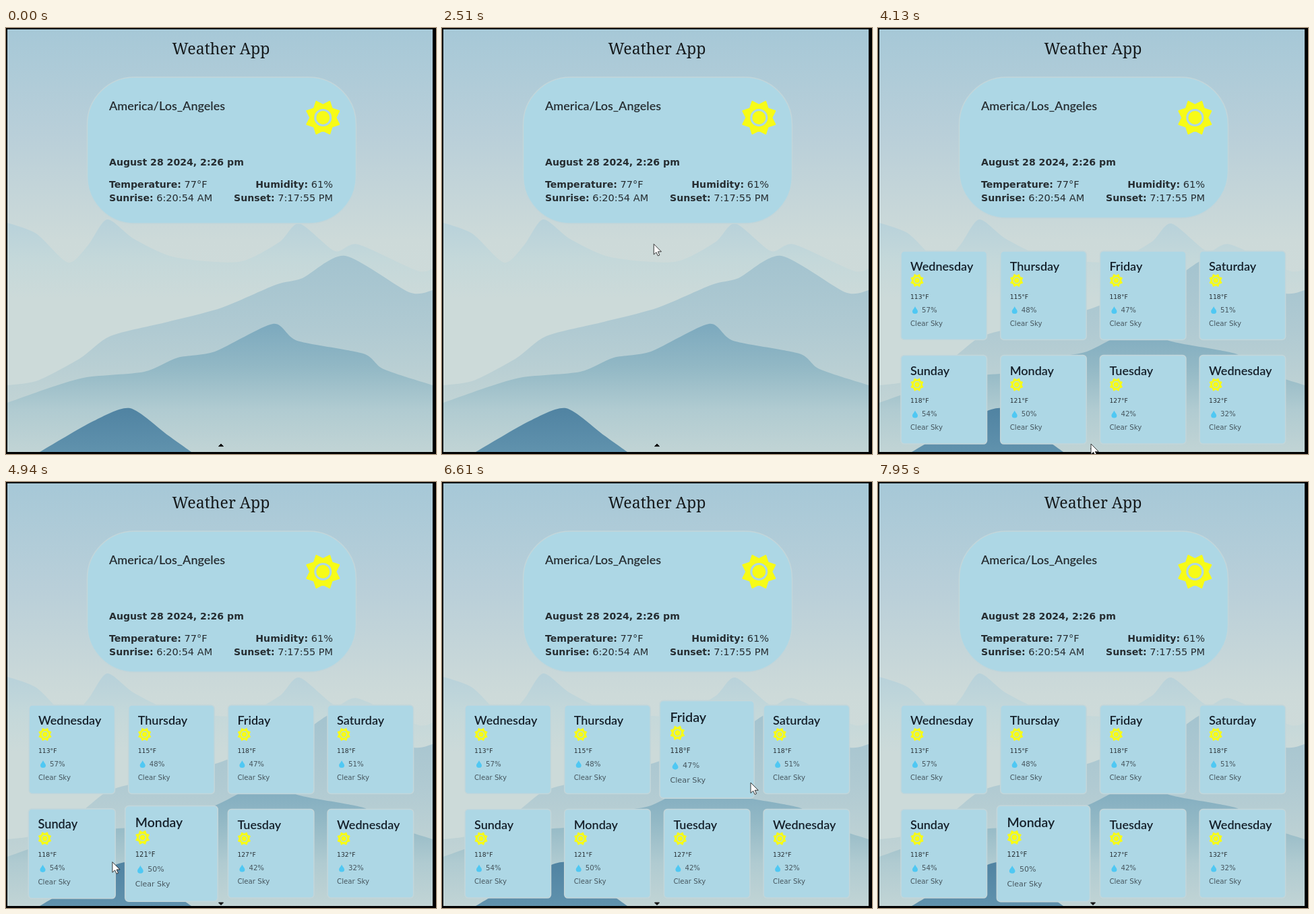
An HTML page for the animation above (8 s loop, 638x632 px).

```html
<!DOCTYPE html>
<html lang="en">
<head>
<meta charset="utf-8">
<title>Weather App</title>
<style>
  html, body { margin: 0; height: 100%; overflow: hidden; background: #000; }
  svg { display: block; width: 638px; height: 632px; }
  text { font-family: "DejaVu Sans", sans-serif; fill: #262d31; }
  .title { font: 23.1px "Noto Serif", serif; text-anchor: middle; fill: #15191b; }
  .head { font: 600 18px Lato, sans-serif; }
  .day { fill: #15202a; }
  .label { font-size: 14.1px; font-weight: bold; }
  .value { font-size: 14.5px; font-weight: normal; }
  .end { text-anchor: end; }
  .temp { font-size: 9.2px; }
  .small { font-size: 10.2px; fill: #46565e; }
  .panel { fill: #add7e5; stroke: #c3d6da; stroke-width: 1.5; }
</style>
</head>
<body>
<svg id="stage" viewBox="0 0 638 632"></svg>
<script>
const LOOP = 8000, OPEN = 4130, CARD_W = 127.5, CARD_H = 131.5;
const stage = document.getElementById('stage');

// Smooth curve through the points, closed along the bottom edge
function ridge(points) {
  const p = points.split(' ').map(s => s.split(',').map(Number));
  const at = i => p[Math.max(0, Math.min(p.length - 1, i))];
  const handle = (i, sign) => [0, 1].map(n => at(i)[n] + sign * (at(i + 1)[n] - at(i - 1)[n]) / 8);
  const curve = p.slice(1).map((q, i) => `C${handle(i, 1)} ${handle(i + 1, -1)} ${q}`).join('');
  return `M${p[0]}${curve}V629H${p[0][0]}Z`;
}

function layer([top, bottom, colours, points], i) {
  const stops = colours.split(' ').map((c, k, all) =>
    `<stop offset="${k / (all.length - 1)}" stop-color="${c}"/>`).join('');
  return `<linearGradient id="g${i}" gradientUnits="userSpaceOnUse" x1="0" x2="0" y1="${top}" y2="${bottom}">${stops}</linearGradient>
    <path fill="url(#g${i})" d="${ridge(points)}"/>`;
}

// Top y, bottom y, gradient, outline; from the sky to the nearest hill
const layers = [
  [2, 629, '#a6c8d7 #b9cfd9 #cddad9 #cfdbda #cbd9d9', '2,2 633,2'],
  [284, 400, '#b7d1da #c4d8da #ccdad9',
    '2,289 45,305 92,348 122,322 150,284 190,313 250,340 345,347 405,318 435,290 488,331 522,321 610,360 633,357'],
  [337, 560, '#a3c3cf #b0cad2 #c2d4d5',
    '2,530 47,523 110,490 155,457 240,436 320,415 400,381 440,371 503,338 598,392 633,389'],
  [439, 629, '#7ca9be #92b8c5 #b0cbd1 #c1d4d5',
    '2,556 70,532 120,518 205,510 255,489 310,480 396,439 432,464 530,483 560,506 633,530'],
  [564, 629, '#5083a2 #6092ad', '50,629 130,583 184,564 240,604 275,629'],
];

const text = (x, y, cls, content) => `<text x="${x}" y="${y}" class="${cls}">${content}</text>`;
const fact = (x, y, name, value, cls = '') =>
  text(x, y, 'label ' + cls, `${name}:<tspan class="value"> ${value}</tspan>`);

function sun(x, y, size) {
  const star = Array.from({ length: 16 }, (_, i) => {
    const r = i % 2 ? 25.7 : 18.7, a = i * Math.PI / 8;
    return [r * Math.cos(a), r * Math.sin(a)].map(v => v.toFixed(1));
  }).join(' ');
  return `<g transform="translate(${x} ${y}) scale(${size})" fill="#f7fb17">
    <polygon points="${star}" stroke="#f7fb17" stroke-width="2.5" stroke-linejoin="round"/>
    <circle r="11.5" stroke="#add7e5" stroke-width="3.1"/></g>`;
}

const days = ['Wednesday', 'Thursday', 'Friday', 'Saturday', 'Sunday', 'Monday', 'Tuesday'];
const temps = [113, 115, 118, 118, 118, 121, 127, 132];
const cards = [57, 48, 47, 51, 54, 50, 42, 32].map((wet, i) => ({
  day: days[i % 7], temp: temps[i], wet,
  x: 34 + i % 4 * 147.7, y: 331 + Math.floor(i / 4) * 154.6,
}));

const card = ({ day, temp, wet }) => `<g>
  <rect class="panel" width="${CARD_W}" height="${CARD_H}" rx="5"/>
  ${text(14, 29, 'head day', day)}${sun(24, 43.5, .385)}
  ${text(14, 70.5, 'temp', temp + '°F')}
  <path d="M21 82C22 85 25 87 25 89.5A4 3.5 0 0 1 17 89.5C17 87 20 85 21 82Z" fill="#4fc8f3"/>
  ${text(31, 90.5, 'small', wet + '%')}${text(14, 110.5, 'small', 'Clear Sky')}</g>`;

stage.innerHTML = layers.map(layer).join('')
  + text(319, 39, 'title', 'Weather App')
  + '<rect id="main" class="panel" x="120.5" y="73" width="399" rx="70"/>'
  + text(153, 122, 'head', 'America/Los_Angeles') + sun(470.3, 133, 1)
  + text(153, 204, 'label', 'August 28 2024, 2:26 pm')
  + fact(153, 236.5, 'Temperature', '77°F') + fact(485, 236.5, 'Humidity', '61%', 'end')
  + fact(153, 256.5, 'Sunrise', '6:20:54 AM') + fact(485, 256.5, 'Sunset', '7:17:55 PM', 'end')
  + `<g id="cards">${cards.map(card).join('')}</g>
  <path id="arrow" d="M-3.5 1.8H3.5L0 -1.8Z" fill="#111" stroke="#111" stroke-linejoin="round"/>
  <path id="cursor" d="M0 0V15.5L3.7 12.2L6.2 17.5L8.6 16.4L6.2 11.3H11.2Z" fill="#fff" stroke="#222" stroke-width=".9"/>`;

const [main, group, arrow, cursor] = ['main', 'cards', 'arrow', 'cursor'].map(id => document.getElementById(id));

// Pointer stops: time, x, y
const stops = [
  [980, 330, 626], [1530, 314, 284], [1920, 314, 280], [2410, 314, 280], [3250, 316, 617],
  [4650, 316, 617], [4940, 158, 564], [5370, 104, 440], [5590, 112, 442], [6620, 458, 446],
  [6850, 530, 460], [7050, 520, 550], [7900, 250, 600], [7950, 250, 645],
];

function pointer(t) {
  const i = Math.max(1, stops.findIndex(s => s[0] >= t));
  const [a, b] = [stops[i - 1], stops[i]], k = (t - a[0]) / (b[0] - a[0]);
  return [1, 2].map(n => a[n] + (b[n] - a[n]) * k);
}

// Share of the last 180 ms spent over the card
function hover({ x, y }, t) {
  let hits = 0;
  for (let back = 0; back < 180; back += 10) {
    const [px, py] = pointer(t - back);
    if (px > x - 3 && px < x + CARD_W + 3 && py > y - 3 && py < y + CARD_H + 3) hits++;
  }
  return hits / 18;
}

function draw(now) {
  let t = now % LOOP;
  // The picture updates more slowly once the pointer tours the cards
  if (t > 5480) t = 5480 + Math.floor((t - 5480) / 95 + .15) * 95;
  const open = t >= OPEN, visible = t >= 980 && t < 7950;
  main.setAttribute('height', open ? 209 : 217);
  group.style.display = open ? '' : 'none';
  arrow.setAttribute('transform', open ? 'translate(319 625.8) scale(1 -1)' : 'translate(319 618.8)');
  cursor.style.display = visible ? '' : 'none';
  if (visible) cursor.setAttribute('transform', `translate(${pointer(t)})`);
  if (open) cards.forEach((c, i) => {
    const grow = .1 * hover(c, t);
    group.children[i].setAttribute('transform',
      `translate(${c.x - CARD_W * grow / 2} ${c.y - CARD_H * grow / 2}) scale(${1 + grow})`);
  });
}

const start = performance.now();
(function tick() {
  draw(performance.now() - start);
  requestAnimationFrame(tick);
})();
</script>
</body>
</html>
```
